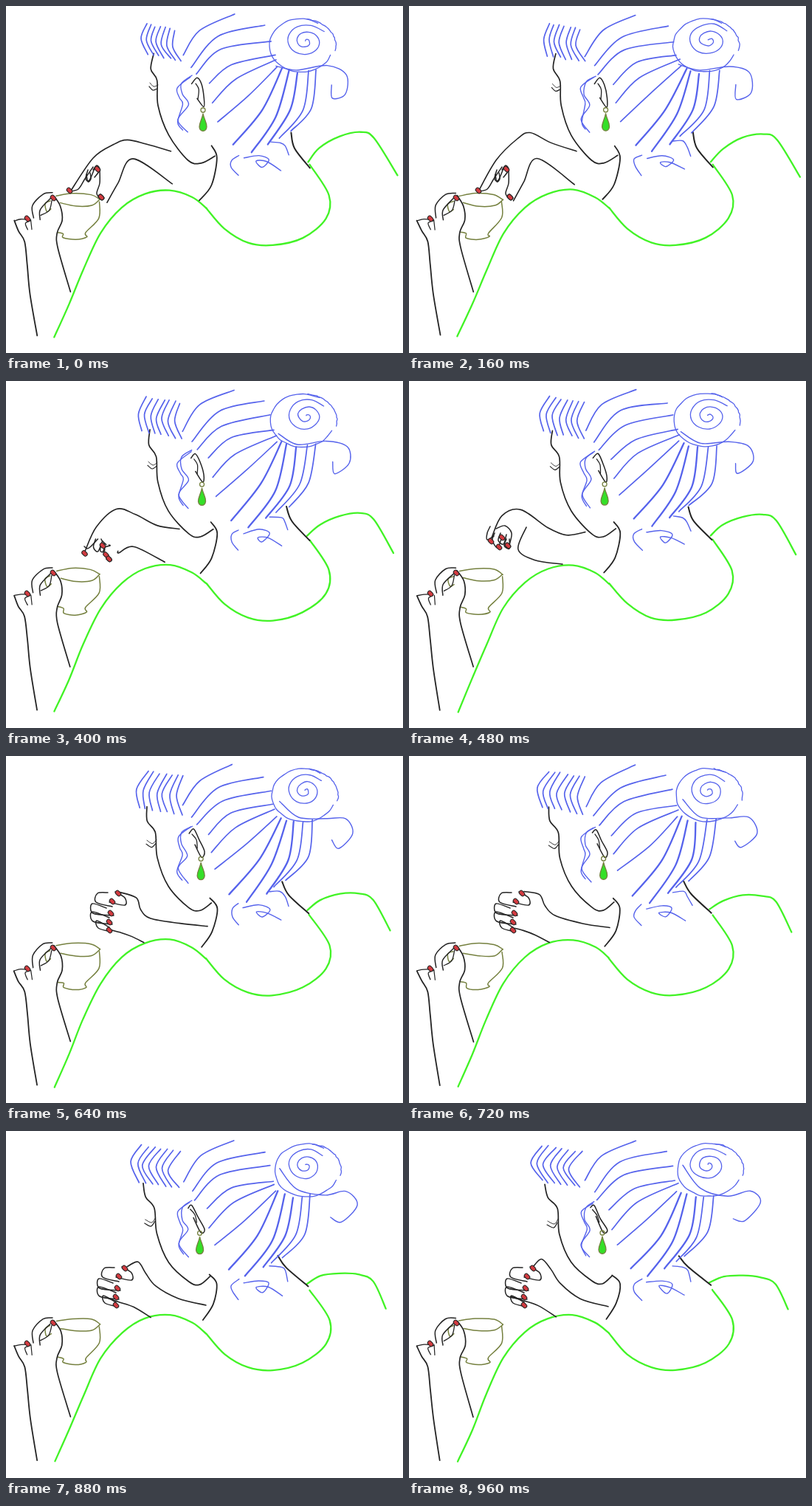
Recreate the animation shown at these times as an HTML page with a canvas. Size 538x470 px, loop 1.04 s.

```html
<!DOCTYPE html>
<html lang="en">
<head>
<meta charset="utf-8">
<title>Tea</title>
<style>
html, body { margin: 0; height: 100%; overflow: hidden; background: #fff; }
canvas { display: block; }
</style>
</head>
<body>
<canvas id="stage" width="538" height="470"></canvas>
<script>
const ctx = document.getElementById('stage').getContext('2d');
const BLUE = '#5663ec', GREEN = '#42f326', INK = '#242424', OLIVE = '#75803f', RED = '#d23b40';
const STEP = 80, STEPS = 13;
const WHOLE = [0, 12], FRINGE = [0, 8, 12], ARM = [0, 4, 6, 8, 12], GRIP = [4, 6, 8];
const parts = [];
let step = 0, lean = 0;

const mix = (a, b, k) => a + (b - a) * k;
const mixPts = (a, b, k) => a.map((p, i) => p.map((v, j) => mix(v, b[i][j], k)));

// Every drawing step shakes the line a little
function shake(seed) {
  const v = Math.sin(seed * 12.9898 + step * 78.233) * 43758.5453;
  return (v - Math.floor(v)) * 2 - 1;
}
const wobble = (pts, amount, seed) => pts.map((p, i) =>
  p.map((v, j) => v + amount * shake(seed * 31 + i * 2 + j)));

function poseAt(keys, times) {
  if (keys.length === 1) return keys[0];
  if (times === WHOLE) return mixPts(keys[0], keys[1], lean);
  if (step <= times[0]) return keys[0];
  const i = times.findIndex(t => t >= step);
  if (i < 0) return keys[keys.length - 1];
  return mixPts(keys[i - 1], keys[i], (step - times[i - 1]) / (times[i] - times[i - 1]));
}

function line(pts, color, width) {
  ctx.strokeStyle = color;
  ctx.lineWidth = width;
  ctx.beginPath();
  ctx.moveTo(...pts[0]);
  for (let i = 0; i < pts.length - 1; i++) {
    const p = pts[i], q = pts[i + 1], before = pts[i - 1] || p, after = pts[i + 2] || q;
    ctx.bezierCurveTo(
      p[0] + (q[0] - before[0]) / 6, p[1] + (q[1] - before[1]) / 6,
      q[0] - (after[0] - p[0]) / 6, q[1] - (after[1] - p[1]) / 6, q[0], q[1]);
  }
  ctx.stroke();
}

// Poses are separated by "|", points by ","
function add(text, draw, times = WHOLE) {
  const keys = text.split('|').map(pose => pose.split(',').map(p => p.split(' ').map(Number)));
  const seed = parts.length;
  parts.push(() => draw(poseAt(keys, times), seed));
}
const stroke = (color, width, text, times, amount = 0.7) =>
  add(text, (pts, seed) => line(wobble(pts, amount, seed), color, width), times);
const hair = text => stroke(BLUE, 1.4, text, WHOLE, 1.5);
const ink = (text, width = 1.5, times) => stroke(INK, width, text, times, 0.5);
const cup = text => stroke(OLIVE, 1.5, text);

// The hand slides right over the cup, then right again at the chin
const slide = pts => {
  const dx = step < 4 ? (step - 4) * 4 : step > 8 ? (step - 8) ** 2 : 0;
  return pts.map(([x, y]) => [x + dx, y]);
};
const finger = text => add(text, pts => line(slide(pts), INK, 1.5), GRIP);
const nail = text => add(text, (pts, seed) => {
  const [[x, y]] = seed < fixedNails ? pts : slide(pts);
  const tip = [[x - 1, y - 1], [x + 1, y + 1]];
  line(tip, INK, 6.5);
  line(tip, RED, 4.5);
}, GRIP);

// Dress
stroke(GREEN, 2.3, '66 448,86 404,105 357,128 308,157 273,188 254,222 249,252 259,271 274');
stroke(GREEN, 2.3, '271 274,296 302,328 320,361 324,402 314,433 288,438 256,411 215');
stroke(GREEN, 2.3, '409 212,425 193,452 177,481 171,499 179,531 230|407 206,426 197,452 195,476 198,497 207,513 242');

// Face, neck, eye
ink('200 64,196 85,205 101,206 135,220 175,247 209,264 213,283 203|184 72,188 90,201 105,204 140,220 178,248 203,262 207,275 196', 1.7);
ink('279 189,286 206,278 243,262 263|275 195,286 207,281 233,267 255', 1.8);
ink('386 171,391 193,412 219|366 169,378 184,409 209', 2);
add('194 109,199 114,205 112|187 127,196 131,201 124', pts => {
  line(pts, INK, 1.2);
  line(pts.map(([x, y]) => [x + 1, y - 5]), INK, 0.9);
});

// Ear and earring
ink('252 105,259 97,265 106,268 124,268 137,259 125|246 104,251 101,259 118,269 134,263 137,253 116');
ink('257 105,261 113,260 126|249 106,255 114,258 124', 1.3);
add('267 138|262 135', ([[x, y]]) => {
  ctx.strokeStyle = OLIVE;
  ctx.lineWidth = 1.3;
  ctx.fillStyle = '#35df28';
  ctx.beginPath();
  ctx.arc(x, y + 3, 3, 0, 7);
  ctx.stroke();
  ctx.beginPath();
  ctx.moveTo(x, y + 8);
  ctx.bezierCurveTo(x + 2, y + 17, x + 5, y + 19, x + 5, y + 26);
  ctx.bezierCurveTo(x + 4, y + 33, x - 4, y + 33, x - 5, y + 26);
  ctx.bezierCurveTo(x - 5, y + 20, x - 2, y + 17, x, y + 8);
  ctx.fill();
  ctx.stroke();
});

// Cup
cup('68 257,90 254,115 255,127 262');
cup('127 262,116 270,95 271,74 267');
cup('126 265,126 287,108 307,109 313,94 317,78 314,78 308,70 306');
cup('60 264,53 268,55 278,61 275');

// Hand holding the cup
ink('11 291,17 305,25 319,29 350,33 390,42 446', 1.8);
ink('65 257,74 271,76 290,69 307,70 328,87 387', 1.7);
ink('37 287,36 270,50 255,63 253');
ink('46 290,46 276,60 261');
ink('62 263,58 277,47 284', 1.3);
ink('11 291,20 289,33 290,26 294,29 303', 1.3);
ink('34 290,35 303', 1.2);
const fixedNails = parts.length + 2;
nail('64 260');
nail('29 288');

// Moving arm and hand
ink('223 197,190 187,165 181,146 187,118 206,86 253|230 196,196 183,163 163,148 173,118 212,102 250|239 205,214 209,188 199,152 174,126 183,112 212|273 231,236 227,196 220,182 208,176 192,152 184|270 238,232 227,205 206,192 187,180 173,168 184', 1.6, ARM);
ink('225 241,172 207,152 240,137 266|223 242,176 207,158 238,145 262|208 248,170 242,148 228,159 198|187 253,170 244,156 239,143 236|199 252,175 237,152 229,138 224', 1.6, ARM);
finger('102 251,114 248,123 234,134 218|110 197,106 206,106 215,115 210|144 204,122 198,124 186,138 185');
finger('127 222,124 234,129 236,136 220|116 206,113 216,120 226,125 214|146 216,118 213,117 200,136 206');
finger('134 222,139 216,143 222,136 232|124 206,121 216,128 221,132 208|144 228,118 224,117 211,140 219');
finger('125 228,127 238,131 234,130 226|132 214,129 223,136 227,136 214|143 238,125 233,123 223,140 232');
finger('145 262,139 254,143 240,143 222|118 200,130 196,139 206,136 222|148 184,161 192,161 202,140 198');
nail('102 250|111 217|152 186');
nail('140 221|122 225|144 197');
nail('145 259|134 223|142 213');
nail('145 259|126 212|140 225');
nail('145 259|134 223|140 236');

// Fringe: seven strands spread between the first and the last
add('190 25,183 45,191 66,229 32,226 54,238 74|192 21,177 45,180 70,241 28,230 55,238 80|181 19,166 42,180 68,235 28,217 52,232 76', (pts, seed) => {
  for (let i = 0; i < 7; i++) {
    const strand = mixPts(pts.slice(0, 3), pts.slice(3), i / 6);
    line(wobble(strand, 1.5, seed + i), BLUE, 1.7);
  }
}, FRINGE);

// Strands swept to the bun, three points each
add('240 68,262 34,308 12,252 82,288 42,350 28,257 93,292 60,359 47,274 106,306 78,362 67,278 132,310 98,365 72,285 155,326 120,366 82,304 188,343 140,372 83,328 198,362 148,380 87,352 186,383 142,391 90,365 178,396 142,405 88,380 170,409 138,417 86', (pts, seed) => {
  for (let i = 0; i < 11; i++) {
    const strand = pts.slice(i * 3, i * 3 + 3).map(([x, y]) => [x - (lean - 0.5) * i, y]);
    line(wobble(strand, 2, seed + i), BLUE, i > 5 && i < 9 ? 2.3 : 1.7);
  }
});

// Bun: outline, outer arc and spiral
function swirl(x, y, rx, ry, from, sweep, shrink, seed) {
  const pts = Array.from({ length: 21 }, (_, i) => {
    const a = from + sweep * i / 20, k = 1 - shrink * i / 20;
    return [x + rx * k * Math.cos(a), y + ry * k * Math.sin(a)];
  });
  line(wobble(pts, 0.6, seed), BLUE, 1.3);
}
parts.push(() => {
  const x = 400 + 7 * lean + shake(5), y = 53 + shake(6);
  swirl(x, y, 43, 36, -1, -4.9, 0, 7);
  swirl(x, y, 47, 36, 0.2, -1.6, 0, 8);
  swirl(406 + shake(9), 47 + shake(10), 28 + 3 * shake(11), 24, -0.6, -14, 0.95, 12);
});
hair('366 82,395 88,436 80,461 92,461 118,441 126,442 106|372 46,395 78,432 88,462 80,477 96,456 122,440 118');

// Lock by the ear, curls on the nape
hair('252 95,239 104,238 120,246 134,234 153,246 172');
hair('250 97,233 110,236 124,240 134,233 156,240 168');
hair('316 201,306 208,306 218,315 229');
hair('322 206,342 202,357 207,348 219,340 211,354 212,374 222');
hair('358 184,372 184,378 190,383 203');

ctx.lineCap = ctx.lineJoin = 'round';
const start = performance.now();
function frame() {
  step = Math.floor((performance.now() - start) / STEP) % STEPS;
  lean = (step / 12) ** 1.4;
  ctx.clearRect(0, 0, 538, 470);
  parts.forEach(draw => draw());
  requestAnimationFrame(frame);
}
frame();
</script>
</body>
</html>
```
